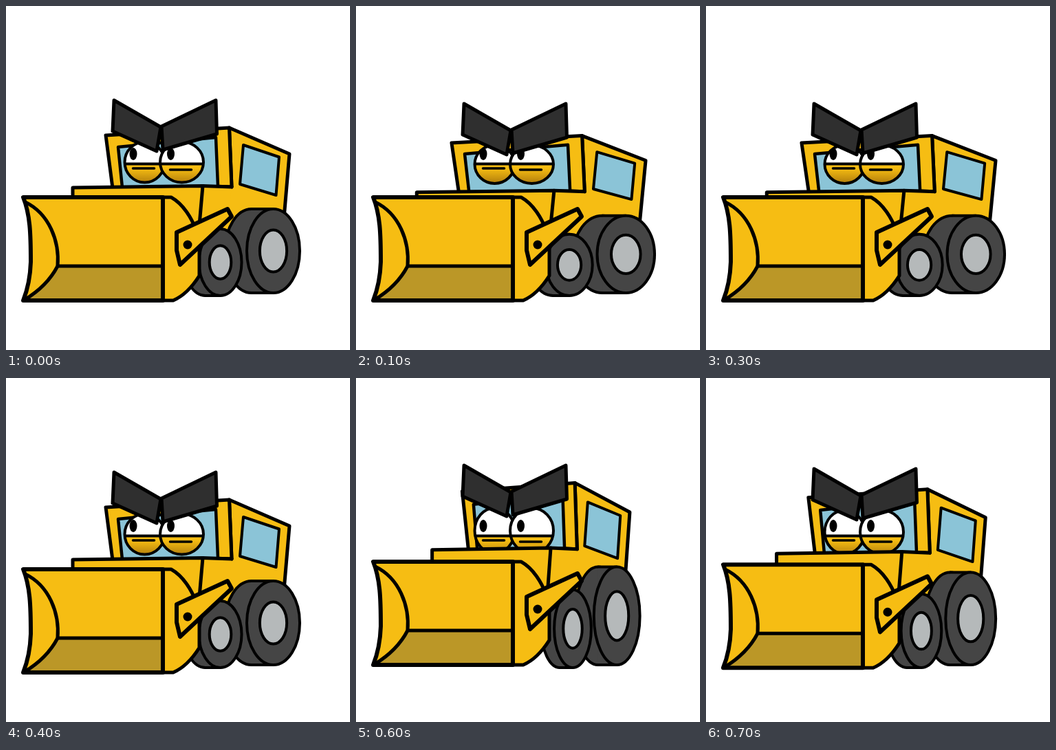
These frames come from a looping animation (500x500 px, 0.8 s). An HTML page with a canvas:

```html
<!DOCTYPE html>
<html lang="en">
<head>
<meta charset="utf-8">
<title>Grumpy bulldozer</title>
<style>
html, body { margin: 0; width: 100%; height: 100%; overflow: hidden; background: #fff; }
canvas { display: block; }
</style>
</head>
<body>
<canvas id="stage" width="500" height="500"></canvas>
<script>
const ctx = document.getElementById('stage').getContext('2d');
const YELLOW = '#f6bd13', FLOOR = '#bb9727', TIRE = '#454545',
      HUB = '#b5b9ba', GLASS = '#8bc4d7', BROW = '#2f2f2f';
const STEP = 100, STEPS = 8;
const PIVOT = { x: 252, y: 382 };

// Outlines that keep their shape
const scoop = new Path2D('M25 278H228V428H25Q35 403 36 372C36 330 35 303 25 278Z');
const floor = new Path2D('M75 378H228V428H27Q60 407 75 378Z');
const curl = new Path2D('M28 285C63 302 78 342 75 378Q60 407 27 427');
const panel = new Path2D('M228 278H240C258 288 270 309 276 325L281 345V392Q264 419 243 428H228Z');
const arm = new Path2D('M248 329L322 295L328 306L253 376L248 355Z');
const brows = new Path2D('M157 137L225 176L219 211L155 182ZM305 137L226 175L228 209L306.5 186Z');

// Squash (-1) to stretch (1) and back, one straight ramp each way
const swing = k => 1 - Math.abs((k + 6) % STEPS - 4) / 2;
const bend = (s, power) => Math.sign(s) * Math.abs(s) ** power;

function paint(path, fill, width) {
  if (fill) { ctx.fillStyle = fill; ctx.fill(path); }
  if (width) { ctx.lineWidth = width; ctx.stroke(path); }
}

function oval(x, y, rx, ry, fill, width) {
  const path = new Path2D();
  path.ellipse(x, y, rx, ry, 0, 0, Math.PI * 2);
  paint(path, fill, width);
  return path;
}

function line(x1, y1, x2, y2, width) {
  paint(new Path2D(`M${x1} ${y1}L${x2} ${y2}`), null, width);
}

function lifted(dy, draw) {
  ctx.save();
  ctx.translate(0, dy);
  draw();
  ctx.restore();
}

function wheel(x, ground, rx, ry, depth) {
  const y = ground - ry, back = x - rx * depth;
  oval(back, y, rx, ry, TIRE, 4);
  ctx.fillStyle = TIRE;
  ctx.fillRect(back, y - ry, x - back, ry * 2);
  line(back, y - ry, x, y - ry, 4);
  line(back, ground, x, ground, 4);
  oval(x, y, rx, ry, TIRE, 4);
  oval(x, y, rx * 0.51, ry * 0.5, HUB, 4);
}

function eye(x, y, rx, ry, pupil, crease) {
  const ball = oval(x, y, rx, ry, '#fff');
  ctx.save();
  ctx.clip(ball);
  oval(pupil, 215, 5.5, 9, '#000');
  const lid = ctx.createLinearGradient(0, 236, 0, 257);
  lid.addColorStop(0, YELLOW);
  lid.addColorStop(1, '#b37f0c');
  ctx.fillStyle = lid;
  ctx.fillRect(x - rx, 230, rx * 2, ry * 2);
  line(x - rx, 229.5, x + rx, 229.5, 4);
  ctx.restore();
  paint(ball, null, 4);
  line(x - 17, crease, x + 14, crease, 3.5);
}

function cab(sx, sy, drawEyes) {
  // Stretch the points only, so the lines keep their weight
  const part = (fill, width, ...points) => {
    const path = new Path2D();
    points.forEach(([x, y]) =>
      path.lineTo(PIVOT.x + (x - PIVOT.x) * sx, PIVOT.y + (y - PIVOT.y) * sy));
    path.closePath();
    paint(path, fill, width);
  };
  const peak = [324.5, 177], sill = [328, 263], bend = [286, 261.5];
  part(YELLOW, 5, peak, [412, 215], [403, 320], [290, 345], [270, 330], bend, sill);
  part(GLASS, 4, [345, 202], [397, 219.5], [392.5, 275], [340, 259]);
  part(YELLOW, 5, [145, 188], peak, sill, bend, [155, 265]);
  part(GLASS, 4.5, [163, 205], [305, 191], [308, 262], [169, 264]);
  drawEyes();
  part(YELLOW, 0, bend, sill, [325, 290], [284, 290]);
  part(null, 5, bend, sill);
  part(YELLOW, 5, [97, 264], bend, [280, 330], [97, 330]);
}

function blade() {
  paint(panel, YELLOW, 5);
  paint(scoop, YELLOW);
  paint(floor, FLOOR);
  line(75, 378, 228, 378, 5);
  paint(scoop, null, 6);
  paint(curl, null, 5);
  paint(arm, YELLOW, 6);
  oval(264, 347, 6.5, 6.5, '#000');
}

function render(s) {
  const wide = bend(s, 1.3), tall = bend(s, 0.7);
  const dx = -wide * (s < 0 ? 0.139 : 0.088);
  const dy = tall * (s < 0 ? 0.092 : 0.12);
  const tireX = 1 + 1.5 * dx, tireY = 1 + 1.4 * dy;

  ctx.fillStyle = '#fff';
  ctx.fillRect(0, 0, 500, 500);
  ctx.strokeStyle = '#000';
  ctx.lineJoin = ctx.lineCap = 'round';

  cab(1 + dx, 1 + dy, () => {
    const y = 227 - 5 * tall, ry = 29.5 * (1 + dy);
    eye(201.5, y, 29, ry, 185, 236);
    eye(255.5, y, 31.5, ry, 239.5, 238);
  });
  wheel(388.5 - 9.3 * wide, 417, 38.5 * tireX, 61 * tireY, 0.82);
  wheel(311.5 + 3.5 * wide, 421, 31 * tireX, 48.5 * tireY, 0.7);
  lifted(-11 * Math.max(0, tall), blade);
  lifted(-10 * s, () => paint(brows, BROW, 5));
}

const start = performance.now();
function tick() {
  const t = Math.max(0, performance.now() - start);
  render(swing(Math.floor(t / STEP) % STEPS));
  requestAnimationFrame(tick);
}
tick();
</script>
</body>
</html>
```
